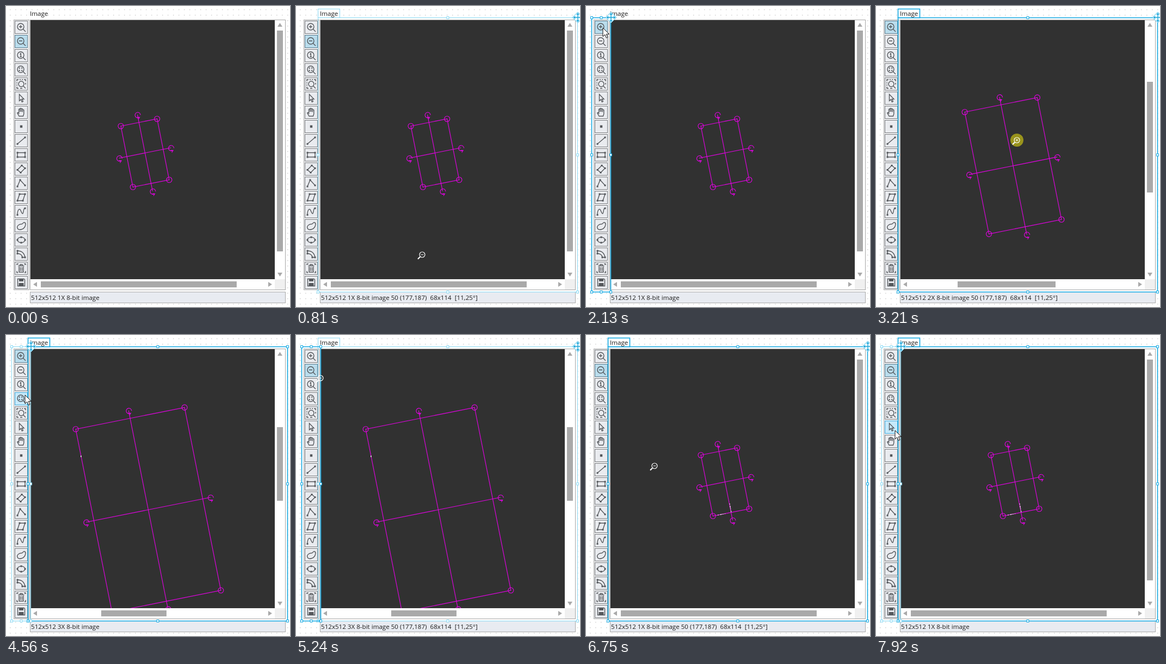
An HTML page that plays this animation: 522 px wide and 552 px high, repeating every 7.99 s.

```html
<!DOCTYPE html>
<html lang="en">
<head>
<meta charset="utf-8">
<title>Image viewer</title>
<style>
html, body { margin: 0; width: 100%; height: 100%; overflow: hidden; background: #fff; }
svg { display: block; }
text { font: 11.6px "Open Sans", "Noto Sans", sans-serif; fill: #1c1c1c; white-space: pre; }
.icon { fill: none; stroke: #55585c; stroke-width: 1.4; }
.icon .solid { fill: #55585c; stroke: none; }
.shape { fill: none; stroke: #e600e6; stroke-width: 1.1; }
.adorner { stroke: #8ad9f4; stroke-width: 1; fill: none; }
.adorner.full { stroke: #14a9e2; stroke-width: 1.6; }
.adorner .grip { fill: #fff; stroke-width: 1; }
</style>
</head>
<body>
<svg id="stage" width="522" height="552" viewBox="0 0 522 552"></svg>
<script>
const NS = 'http://www.w3.org/2000/svg';
const stage = document.getElementById('stage');
const LOOP = 7990;

function add(parent, tag, attrs = {}, text) {
  const el = document.createElementNS(NS, tag);
  for (const key in attrs) el.setAttribute(key, attrs[key]);
  if (text) el.textContent = text;
  parent.appendChild(el);
  return el;
}
const box = (parent, x, y, width, height, attrs) => add(parent, 'rect', { x, y, width, height, ...attrs });
const path = (parent, d, attrs) => add(parent, 'path', { d, ...attrs });
const group = (parent, attrs) => add(parent, 'g', attrs);
const show = (el, on) => el.setAttribute('visibility', on ? 'inherit' : 'hidden');

// Dotted design surface
const defs = add(stage, 'defs');
const dots = add(defs, 'pattern', { id: 'dots', x: 7, y: 6, width: 10, height: 10, patternUnits: 'userSpaceOnUse' });
box(dots, 0, 0, 1.5, 1.5, { fill: '#d0d0d0' });
box(add(defs, 'clipPath', { id: 'view' }), 45, 26, 449, 475);
box(stage, 0, 0, 522, 552, { fill: 'url(#dots)' });

// Panels
const title = add(stage, 'text', { x: 44, y: 18 }, 'Image');
box(stage, 14.5, 25.5, 28, 495, { fill: '#f4f5f7', stroke: '#a6a6a6' });
box(stage, 44.5, 25.5, 469, 495, { fill: '#fff', stroke: '#a6a6a6' });
box(stage, 45, 26, 449, 475, { fill: '#313131' });
box(stage, 494, 501, 19, 19, { fill: '#f0f0f0' });
path(stage, 'M499 38l4.5-7 4.5 7zM499 489l4.5 7 4.5-7zM57 506l-7 4.5 7 4.5zM482 506l7 4.5-7 4.5z', { fill: '#a9a9a9' });
const vThumb = box(stage, 498, 45, 11, 405, { fill: '#a9a9a9' });
const hThumb = box(stage, 64, 505, 360, 11, { fill: '#a9a9a9' });
box(stage, 44.5, 524.5, 469, 20, { fill: '#e8ebf1', stroke: '#a9a9a9' });
const status = add(stage, 'text', { x: 46, y: 539 });

// Toolbar icons: stroked path and optional filled path, in a 24 px cell
const lens = 'M17 11a6 6 0 1 1-12 0a6 6 0 1 1 12 0';
const tail = 'M15.5 15.5L20 20';
const knots = (...p) => p.map(([x, y]) => `M${x - 1.5} ${y - 1.5}h3v3h-3z`).join('');
const icons = [
  [lens + tail + 'M8 11h6M11 8v6'],
  [lens + tail + 'M8 11h6'],
  [lens + tail + 'M9.5 9.5L11.3 8V14M9.5 14h3.5'],
  [lens + tail + 'M8.5 10V8.5H10M12 8.5h1.5V10M13.5 12v1.5H12M10 13.5H8.5V12'],
  ['M17 12a5 5 0 1 1-10 0a5 5 0 1 1 10 0M16 16l4 4M4 7V4h3M9 4h2M13 4h2M17 4h3v3M20 10v3M4 9v2M4 13v2M4 17v3h3M10 20h4'],
  ['M8.5 5V17L11.3 14.5L13.4 19L15.4 18L13.3 13.8H17Z'],
  ['M8 19L4.8 13.2q.8-1.8 2.8.6V6.7q1.2-1.8 2.2 0V11V5.3q1.3-1.5 2.3 0V11V5.8q1.3-1.4 2.3 0V11.5V7.8q1.4-1.3 2.4 0V15L15.5 19Z'],
  ['', knots([12, 12]) + 'M9.8 9.8h4.4v4.4H9.8z'],
  ['M5 18L19 6', knots([5, 18], [19, 6])],
  ['M5 8H19V16H5Z', knots([5, 8], [19, 8], [5, 16], [19, 16])],
  ['M5 13.5L13 5.5L19 10.5L11 18.5Z', knots([5, 13.5], [13, 5.5], [19, 10.5], [11, 18.5])],
  ['M5 18L10 6L19 16', knots([5, 18], [10, 6], [19, 16])],
  ['M5 18L9 6H19L15 18Z', knots([5, 18], [9, 6], [19, 6], [15, 18])],
  ['M5 18C5 8 9 5 11 10S15 19 16 12S18 6 20 6', knots([5, 18], [19, 6])],
  ['M6 18C2 13 8 9 12 9S15 5 18 6S20 12 18 15S9 21 6 18Z'],
  ['M19 12a7 5 0 1 1-14 0a7 5 0 1 1 14 0', knots([5, 12], [19, 12], [12, 7], [12, 17])],
  ['M5 6Q17 6 19 18H14Q13 11 5 11Z', knots([5, 6], [5, 11], [19, 18], [14, 18])],
  ['M8 9V19H16V9M6.5 7.5H17.5M10 7V5h4V7M10.5 10v7M13.5 10v7M4 6V4h3M17 4h3v2M4 17v3h2M18 20h2v-3'],
  ['M5.5 5.5H17L18.5 7V18.5H5.5Z', 'M8 5h8v5H8zM7.5 13h9v6h-9z']
];
const buttons = icons.map(([line, solid], i) => {
  const g = group(stage, { class: 'icon', transform: `translate(16 ${27 + 26 * i})` });
  const face = box(g, .5, .5, 23, 23, { stroke: '#77797c', 'stroke-width': 1 });
  path(g, line);
  if (solid) path(g, solid, { class: 'solid' });
  return face;
});

// Rotated rectangle region
const region = group(stage, { 'clip-path': 'url(#view)' });
const frame = path(region, '', { class: 'shape' });
const corners = [0, 1, 2, 3].map(() => add(region, 'circle', { r: 5, class: 'shape' }));
const turners = [0, 1, 2, 3].map(() => path(region, 'M3 4A5 5 0 1 1 5 0M-1 4H3.5L1 8', { class: 'shape' }));
const flecks = path(region, 'M242 330.3L256 327.6M264 309L267 325', { stroke: '#fff', 'stroke-dasharray': '2 2 4 1', fill: 'none' });
const fleck = box(region, 137, 221, 1.6, 3, { fill: '#ddd' });

const layouts = {
  1: { cx: 255.5, cy: 269.5, v: [45, 405], h: [64, 360] },
  2: { cx: 252, cy: 293, v: [139, 203], h: [150, 180] },
  3: { cx: 261.5, cy: 320.5, v: [169, 135], h: [175, 120] }
};
const TILT = -11.25 * Math.PI / 180, COS = Math.cos(TILT), SIN = Math.sin(TILT);

function drawRegion(zoom) {
  const { cx, cy, v, h } = layouts[zoom];
  const w = 34 * zoom, tall = 57 * zoom, reach = 14.5;
  const at = (x, y) => [cx + x * COS - y * SIN, cy + x * SIN + y * COS];
  const quad = [at(-w, -tall), at(w, -tall), at(w, tall), at(-w, tall)];
  const ends = [at(0, -tall - reach), at(0, tall + reach), at(-w - reach, 0), at(w + reach, 0)];
  frame.setAttribute('d', `M${quad.join('L')}ZM${ends[0]}L${ends[1]}M${ends[2]}L${ends[3]}`);
  quad.forEach(([x, y], i) => corners[i].setAttribute('transform', `translate(${x} ${y})`));
  ends.forEach(([x, y], i) => turners[i].setAttribute('transform', `translate(${x + .6} ${y + .7})`));
  vThumb.setAttribute('y', v[0]);
  vThumb.setAttribute('height', v[1]);
  hThumb.setAttribute('x', h[0]);
  hThumb.setAttribute('width', h[1]);
}

// Outlines for hovered and selected controls
function makeAdorner(x0, y0, x1, y1, label) {
  const g = group(stage, { class: 'adorner' });
  path(g, `M${x0} ${y0}H${x1}V${y1}H${x0}Z`);
  if (label) {
    box(g, x0, 5.5, 40, y0 - 5.5, { fill: '#fff' });
    add(g, 'text', { x: 44, y: 18, stroke: 'none' }, label);
  }
  const mx = Math.round((x0 + x1) / 2), my = Math.round((y0 + y1) / 2);
  for (const x of [x0, mx, x1]) for (const y of [y0, my, y1]) {
    if ((x === mx && y === my) || (label && x === x0 && y === y0)) continue;
    box(g, x - 2, y - 2, 4, 4, { class: 'grip' });
  }
  return g;
}
const adorners = {
  status: makeAdorner(40.5, 521.5, 517.5, 548.5),
  image: makeAdorner(40.5, 21.5, 517.5, 524.5, 'Image'),
  tools: makeAdorner(10.5, 21.5, 45.5, 524.5)
};
const movers = { status: [518, 521], image: [518, 21], tools: [46, 21] };
const mover = group(stage);
path(mover, 'M0-10L10 0L0 10L-10 0Z', { fill: '#eaf8fd', stroke: '#62c6ea' });
path(mover, 'M-7 0H7M0-7V7M-2-5L0-7.5L2-5M-2 5L0 7.5L2 5M-5-2L-7.5 0L-5 2M5-2L7.5 0L5 2', { fill: 'none', stroke: '#1ba5d8', 'stroke-width': 1.3 });

// Pointer
const pointer = group(stage);
const halo = add(pointer, 'circle', { r: 12, fill: '#99931c' });
const arrow = path(pointer, 'M0 0V16L3.8 12.5L6.4 18.5L9 17.4L6.4 11.6H11.5Z', { fill: '#fff', stroke: '#111' });
const glass = group(pointer, { fill: 'none', stroke: '#fff' });
add(glass, 'circle', { r: 5, 'stroke-width': 1.2 });
path(glass, 'M-4 4L-8 8', { 'stroke-width': 2.2 });
path(glass, 'M-2.5 0H2.5');
const plus = path(glass, 'M0-2.5V2.5');

// Timeline: [ms, x, y] for the pointer, [ms, value] for states
const moves = [
  [670, 300, 548], [780, 250, 490], [1000, 120, 250], [1160, 42, 100], [1230, 34, 87],
  [1450, 33, 52], [1780, 31, 40], [2390, 31, 40], [2520, 50, 62], [3010, 259, 246],
  [3280, 259, 246], [3550, 233, 238], [4090, 233, 238], [4480, 46, 125], [4560, 35, 110],
  [4830, 33, 63], [5110, 33, 63], [5250, 46, 80], [5650, 262, 300], [5860, 273, 310],
  [6530, 273, 310], [6750, 126, 240], [7020, 52, 208], [7290, 43, 202], [7640, 33, 120],
  [7920, 35, 175]
];
const zooms = [[0, 1], [3210, 2], [3750, 3], [5990, 2], [6260, 1]];
const selections = [[0, ''], [1780, 'tools'], [3210, 'image'], [4970, 'tools'], [5990, 'image']];
const tools = [[0, 1], [1850, 0], [4970, 1]];
const clicks = [[1780, 1920], [3210, 3350], [3750, 3890], [4970, 5040], [5930, 6070], [6260, 6410]];

const current = (steps, t) => steps.filter(s => s[0] <= t).pop()[1];

function position(t) {
  const i = moves.findIndex(m => m[0] > t);
  if (i < 0) return moves[moves.length - 1].slice(1);
  const [t0, x0, y0] = moves[i - 1], [t1, x1, y1] = moves[i];
  const k = (t - t0) / (t1 - t0);
  return [x0 + (x1 - x0) * k, y0 + (y1 - y0) * k];
}

function hoverAt(t, x, y) {
  if (t < 670) return t >= 190 && t < 470 ? 'status' : '';
  if (y > 521) return 'status';
  return x < 45 ? 'tools' : 'image';
}

function render(t) {
  const active = t >= 670;
  const [x, y] = active ? position(t) : [0, 0];
  const hover = hoverAt(t, x, y);
  const selected = current(selections, t);
  const tool = current(tools, t);
  const zoom = current(zooms, t);
  const hot = hover === 'tools' ? Math.floor((y - 27) / 26) : -1;

  drawRegion(zoom);
  show(flecks, t >= 6260);
  show(fleck, zoom === 3);
  status.textContent = `512x512 ${zoom}X 8-bit image` + (hover === 'image' ? ' 50 (177,187)  68x114  [11,25°]' : '');

  buttons.forEach((face, i) => {
    const on = i === tool || (i === 1 && t < 2130);
    face.setAttribute('fill', on ? '#b9dcec' : i === hot ? '#c5e9fb' : '#e9ebef');
    face.setAttribute('stroke', on ? '#58788a' : i === hot ? '#3ba4d4' : '#77797c');
  });

  for (const name in adorners) {
    show(adorners[name], name === hover || name === selected);
    adorners[name].classList.toggle('full', name === selected);
  }
  const fading = t >= 190 && t < 260 || t >= 400 && t < 470;
  adorners.status.setAttribute('opacity', fading ? .5 : 1);
  mover.setAttribute('opacity', fading ? .5 : 1);
  show(mover, hover);
  if (hover) mover.setAttribute('transform', `translate(${movers[hover]})`);

  show(pointer, active);
  pointer.setAttribute('transform', `translate(${Math.round(x)} ${Math.round(y)})`);
  show(halo, clicks.some(([a, b]) => t >= a && t < b));
  show(arrow, hover !== 'image');
  show(glass, hover === 'image');
  show(plus, tool === 0);
}

const start = performance.now();
function tick() {
  render((performance.now() - start) % LOOP);
  requestAnimationFrame(tick);
}
tick();
</script>
</body>
</html>
```
